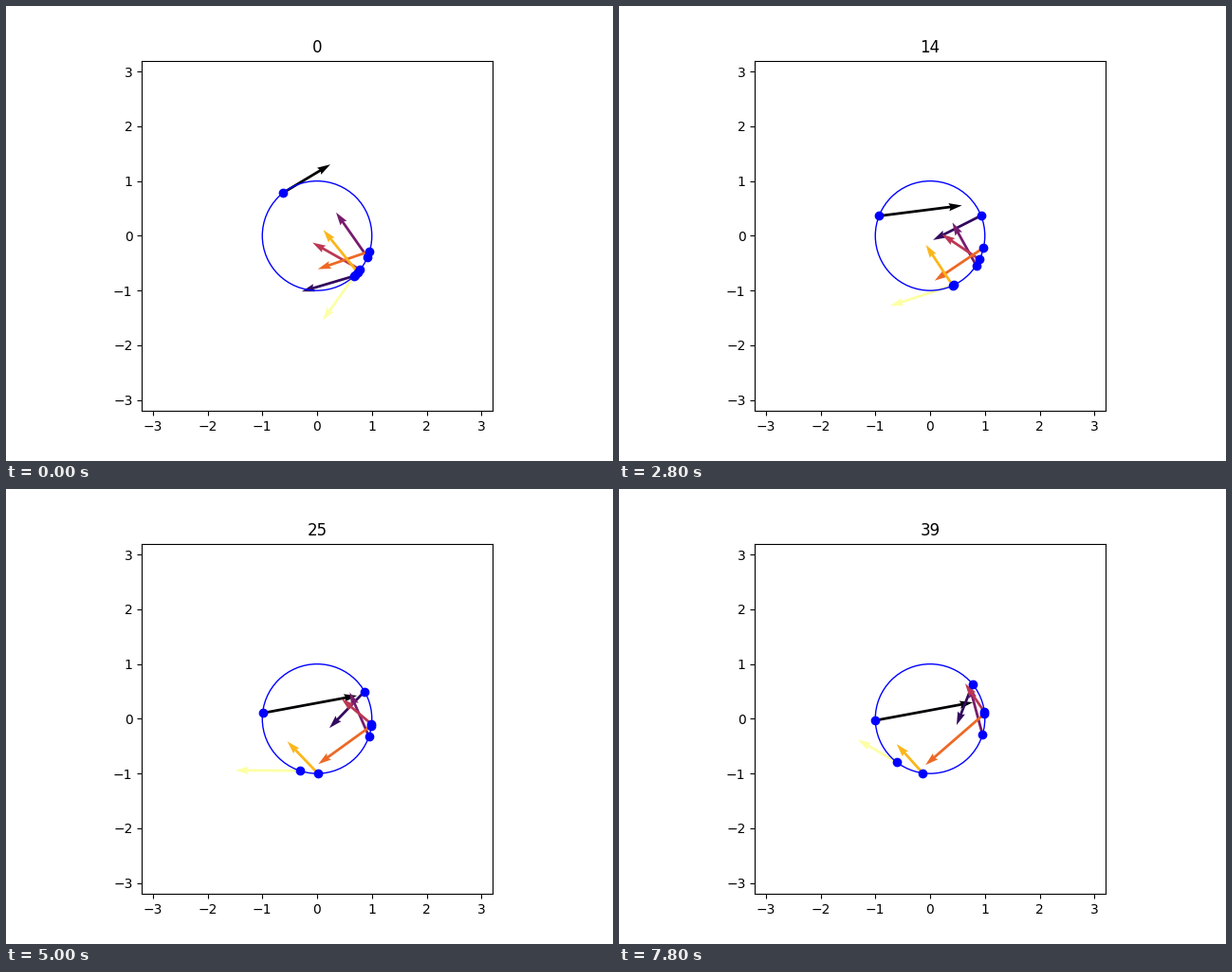
Animation of 640x480 px, one loop 8000 ms. Source, as a matplotlib script:

```python
import numpy as np
import matplotlib.pyplot as plt
from matplotlib.animation import FuncAnimation

STEPS = 40

# One row per arrow. Each path is a smooth curve through evenly spaced values:
# place on the circle (deg), heading (deg), and length after a start at 1.
ARROWS = [
    ((128, 157, 175, 181.7), (31, 7.5, 11, 10.5), (1.66, 1.81)),
    ((-47.2, 19.5, 30, 39), (196.5, 205.5, 228, 248.5), (0.96, 0.8)),
    ((-23.1, -33.5, -17.6, -16.8), (125, 119.5, 113, 105), (0.88, 0.94)),
    ((-38.2, -27.3, -4, 7), (150.4, 146.5, 139, 124), (0.77, 0.63)),
    ((-16.5, -13, -6.6, 5.4), (199, 213.5, 216, 221), (1.13, 1.43)),
    ((-42, -63.3, -90.8, -97.8), (129, 122.7, 134.5, 132), (0.85, 0.71)),
    ((-46.8, -60.5, -112, -127.5), (234.5, 200, 178, 150), (1.23, 0.82)),
]


def curve(rows):
    """Polynomials through each row's values, spread evenly over the loop."""
    rows = np.array(rows)
    count = rows.shape[1]
    return np.polyfit(np.linspace(0, 1, count), rows.T, count - 1)


places, headings, lengths = zip(*ARROWS)
place = curve(np.radians(places))
heading = curve(np.radians(headings))
length = curve([(1, *row) for row in lengths])


def polar(angle, radius=1):
    return radius * np.cos(angle), radius * np.sin(angle)


def state(step):
    u = step / (STEPS - 1)
    points = polar(np.polyval(place, u))
    vectors = polar(np.polyval(heading, u), np.polyval(length, u))
    return points, vectors


fig, ax = plt.subplots(figsize=(6.4, 4.8), dpi=100)
ax.set_aspect("equal")
ax.set(xlim=(-3.2, 3.2), ylim=(-3.2, 3.2),
       xticks=range(-3, 4), yticks=range(-3, 4))
title = ax.set_title("0")

points, vectors = state(0)
shades = np.arange(len(ARROWS))
arrows = ax.quiver(*points, *vectors, shades, cmap="inferno",
                   scale_units="xy", scale=1, zorder=1)
ax.add_patch(plt.Circle((0, 0), 1, fill=False, color="b", zorder=1.5))
dots, = ax.plot(*points, "bo")


def update(step):
    points, vectors = state(step)
    arrows.set_offsets(np.column_stack(points))
    arrows.set_UVC(*vectors, shades)
    dots.set_data(*points)
    title.set_text(str(step))
    return arrows, dots, title


anim = FuncAnimation(fig, update, frames=STEPS, interval=200,
                     repeat=True, repeat_delay=0)
plt.show()
```
